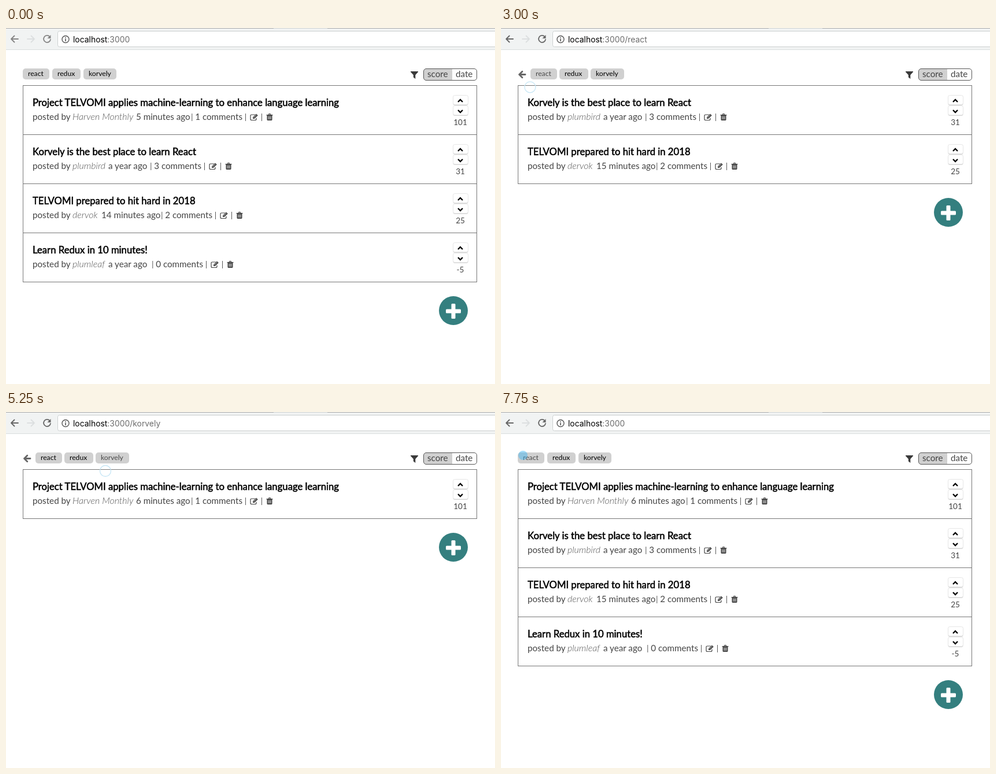
An HTML page for the animation above (8000 ms loop, 846x616 px).

```html
<!DOCTYPE html>
<html lang="en">
<head>
<meta charset="utf-8">
<title>Post list</title>
<style>
  html, body { margin: 0; width: 100%; height: 100%; overflow: hidden; background: #fff; }
  svg { display: block; font: 15.2px Lato, sans-serif; }
  text { white-space: pre; fill: #444; }
  .url { font: 13.9px Inter, sans-serif; fill: #6c6c6c; }
  .title { font-size: 16.7px; fill: #000; stroke: #000; stroke-width: .55px; }
  .author { font-size: 16px; font-weight: 300; font-style: italic; fill: #555; }
  .bar { font-size: 12.5px; }
  .tag { font-size: 12.2px; fill: #000; }
  .hover { fill: #484848; }
  .votes { font-size: 13.5px; text-anchor: middle; }
  .end { text-anchor: end; }
  .line { fill: none; stroke-linecap: round; stroke-linejoin: round; }
</style>
</head>
<body>
<svg id="stage" width="846" height="616" viewBox="0 0 846 616"></svg>
<script>
const LOOP = 8000, STEP = 250;
const stage = document.getElementById('stage');

const posts = [
  { title: 'Project TELVOMI applies machine-learning to enhance language learning', author: 'Harven Monthly',
    age: late => `${late ? 6 : 5} minutes ago`, comments: 1, votes: 101, ageX: 225, iconX: 422 },
  { title: 'Korvely is the best place to learn React', author: 'plumbird',
    age: () => 'a year ago', comments: 3, votes: 31, ageX: 177, iconX: 351 },
  { title: 'TELVOMI prepared to hit hard in 2018', author: 'dervok',
    age: late => `${late ? 15 : 14} minutes ago`, comments: 2, votes: 25, ageX: 165, iconX: 370 },
  { title: 'Learn Redux in 10 minutes!', author: 'plumleaf',
    age: () => 'a year ago', comments: 0, votes: -5, ageX: 177, iconX: 354 },
];

const pages = [
  { from: 0, path: '', rows: [0, 1, 2, 3] },
  { from: 2750, path: 'react', rows: [1, 2] },
  { from: 5250, path: 'korvely', rows: [0] },
  { from: 6750, path: '', rows: [0, 1, 2, 3] },
];

// The pointer is a filled dot while moving and a faint ring after a click; keys are [ms, x, y].
const pointer = [
  { keys: [[1000, 791, 79], [1500, 220, 64], [1750, 68, 62], [2000, 57, 59], [2250, 51, 80]] },
  { ring: true, keys: [[2500, 51, 99], [3250, 50, 104]] },
  { keys: [[3500, 58, 84], [4000, 187, 80], [4250, 195, 80], [4500, 176, 80], [4750, 169, 82]] },
  { ring: true, keys: [[5250, 172, 102]] },
  { keys: [[5500, 172, 84], [6000, 60, 82], [6250, 38, 80]] },
  { ring: true, keys: [[6500, 38, 100]] },
  { keys: [[7750, 38, 75]] },
];

const hovers = [
  { from: 2750, to: 3500, tag: 'react' },
  { from: 4500, to: 5500, tag: 'korvely' },
  { from: 7500, to: LOOP, tag: 'react' },
];

const text = (x, y, content, cls = '') => `<text x="${x}" y="${y}" class="${cls}">${content}</text>`;
const rect = (x, y, w, h, fill, extra = '') =>
  `<rect x="${x}" y="${y}" width="${w}" height="${h}" fill="${fill}" ${extra}/>`;
const line = (d, color, width) => `<path class="line" d="${d}" stroke="${color}" stroke-width="${width}"/>`;
const shape = (d, color) => `<path d="${d}" fill="${color}"/>`;
const at = (x, y, content) => `<g transform="translate(${x} ${y})">${content}</g>`;
const bar = '<tspan class="bar">|</tspan>';

function browserBar(path, focused) {
  const ink = focused ? '#666' : '#858585';
  return rect(0, 0, 846, 38, '#f1f3f3')
    + rect(0, 0, 846, 1, '#aaa') + rect(463, 0, 93, 1, '#d0d4d4')
    + rect(0, 37, 846, 1, '#d9dede')
    + line('M21 19H9M14.5 13.5L9 19L14.5 24.5', ink, 1.8)
    + line('M37 19H49M43.5 13.5L49 19L43.5 24.5', '#dcdfe0', 1.8)
    + line('M75.6 15A6 6 0 1 0 77 19.8', ink, 1.8)
    + shape('M77.5 12V18H71.5Z', ink)
    + rect(89.5, 5.5, 770, 27, '#fff', 'rx="3" stroke="#cbcfcf"')
    + '<circle cx="103" cy="19.5" r="6" fill="none" stroke="#555" stroke-width="1.4"/>'
    + rect(102.2, 18.5, 1.6, 4.5, '#555') + rect(102.2, 15.8, 1.6, 1.6, '#555')
    + text(116, 24.5, `<tspan fill="#000">localhost</tspan>:3000${path && '/' + path}`, 'url');
}

function filters(path, hovered) {
  const tags = path
    ? [['react', 51, 46], ['redux', 101, 50], ['korvely', 155, 58]]
    : [['react', 29, 46], ['redux', 80, 49], ['korvely', 134, 57]];
  const back = path ? line('M42 80.5H32M36.8 75.2L31.5 80.5L36.8 85.8', '#666', 2.8) : '';
  return back
    + tags.map(([name, x, w]) => rect(x, 70, w, 19, '#d0d0d0', 'rx="5"')
      + text(x + 9, 83, name, name === hovered ? 'tag hover' : 'tag')).join('')
    + shape('M700 75H713V76L708.3 81.2V88L704.8 85.3V81.2L700 76Z', '#3a3a3a')
    + rect(722.5, 70.5, 92, 20, '#fff', 'rx="4.5"')
    + shape('M772 70.5H727A4.5 4.5 0 0 0 722.5 75V86A4.5 4.5 0 0 0 727 90.5H772Z', '#d0d0d0')
    + rect(722.5, 70.5, 92, 20, 'none', 'rx="4.5" stroke="#555"')
    + text(729, 85, 'score') + text(778, 85, 'date');
}

const editIcon = line('M9 2H3Q1 2 1 4V9.5Q1 11.5 3 11.5H9Q11 11.5 11 9.5V8', '#444', 1.2)
  + shape('M5 9V6.5L11 .5L13.8 3.2L7.7 9Z', '#444')
  + line('M6.5 7L11 2.6', '#fff', .7);

const trashIcon = shape('M0 2H3L4 0H7L8 2H11V3.3H10V10.5Q10 12 8.5 12H2.5Q1 12 1 10.5V3.3H0Z', '#444')
  + line('M3.5 5V9.7M5.5 5V9.7M7.5 5V9.7', '#fff', .8)
  + line('M4.5 1.6H6.5', '#fff', .7);

function voteButton(y, direction) {
  return rect(773.5, y + 1, 26, 17, '#d8d8d8', 'rx="3"')
    + rect(773.5, y + .5, 26, 16, '#fff', 'rx="3" stroke="#e6e6e6"')
    + `<path d="M782 ${y + 10 + direction * -2}l4 ${direction * 4}l4 ${-direction * 4}" fill="none" stroke="#000" stroke-width="2.3"/>`;
}

function postRow(post, top, late) {
  const { title, author, age, comments, votes, ageX, iconX } = post;
  return at(0, top,
    rect(29.5, .5, 785, 85, '#fff', 'stroke="#777"')
    + text(46, 35.5, title, 'title')
    + text(46, 60, 'posted by')
    + text(115, 60, author, 'author')
    + text(ageX, 60, age(late))
    + text(iconX - 13, 60, `${bar} ${comments} comments`, 'end')
    + text(iconX - 9, 60, bar) + text(iconX + 19, 60, bar)
    + at(iconX, 49, editIcon) + at(iconX + 28.5, 49, trashIcon)
    + voteButton(17, -1) + voteButton(35, 1)
    + text(786, 69, votes, 'votes'));
}

function addButton(y) {
  return at(774, y, '<circle r="25" fill="#347f7f"/>'
    + rect(-13, -2.5, 26, 7, '#fff', 'rx="1.5"') + rect(-3.5, -12, 7, 26, '#fff', 'rx="1.5"'));
}

function pointerMark(time) {
  const phase = pointer.findLast(p => time >= p.keys[0][0]);
  if (!phase) return '';
  const { keys, ring } = phase;
  const i = keys.findLastIndex(key => time >= key[0]);
  const a = keys[i], b = keys[i + 1] || a;
  const k = a === b ? 0 : (time - a[0]) / (b[0] - a[0]);
  const x = a[1] + (b[1] - a[1]) * k, y = a[2] + (b[2] - a[2]) * k;
  const look = ring ? 'r="9.5" fill="none" stroke="#c6e6f5" stroke-width="1.3"' : 'r="8" fill="rgba(60,180,242,.46)"';
  return `<circle cx="${x}" cy="${y}" ${look}/>`;
}

function draw(time) {
  const { path, rows } = pages.findLast(page => time >= page.from);
  const hover = hovers.find(h => time >= h.from && time < h.to);
  stage.innerHTML = browserBar(path, time >= 2250)
    + filters(path, hover && hover.tag)
    + rows.map((n, i) => postRow(posts[n], 99 + 85 * i, time >= 2750)).join('')
    + addButton(149 + 85 * rows.length)
    + pointerMark(time);
}

const start = performance.now();
let shown = -1;
function tick() {
  const elapsed = (performance.now() - start) % LOOP;
  const time = Math.floor(elapsed / STEP) * STEP;
  if (time !== shown) draw(shown = time);
  requestAnimationFrame(tick);
}
tick();
</script>
</body>
</html>
```
